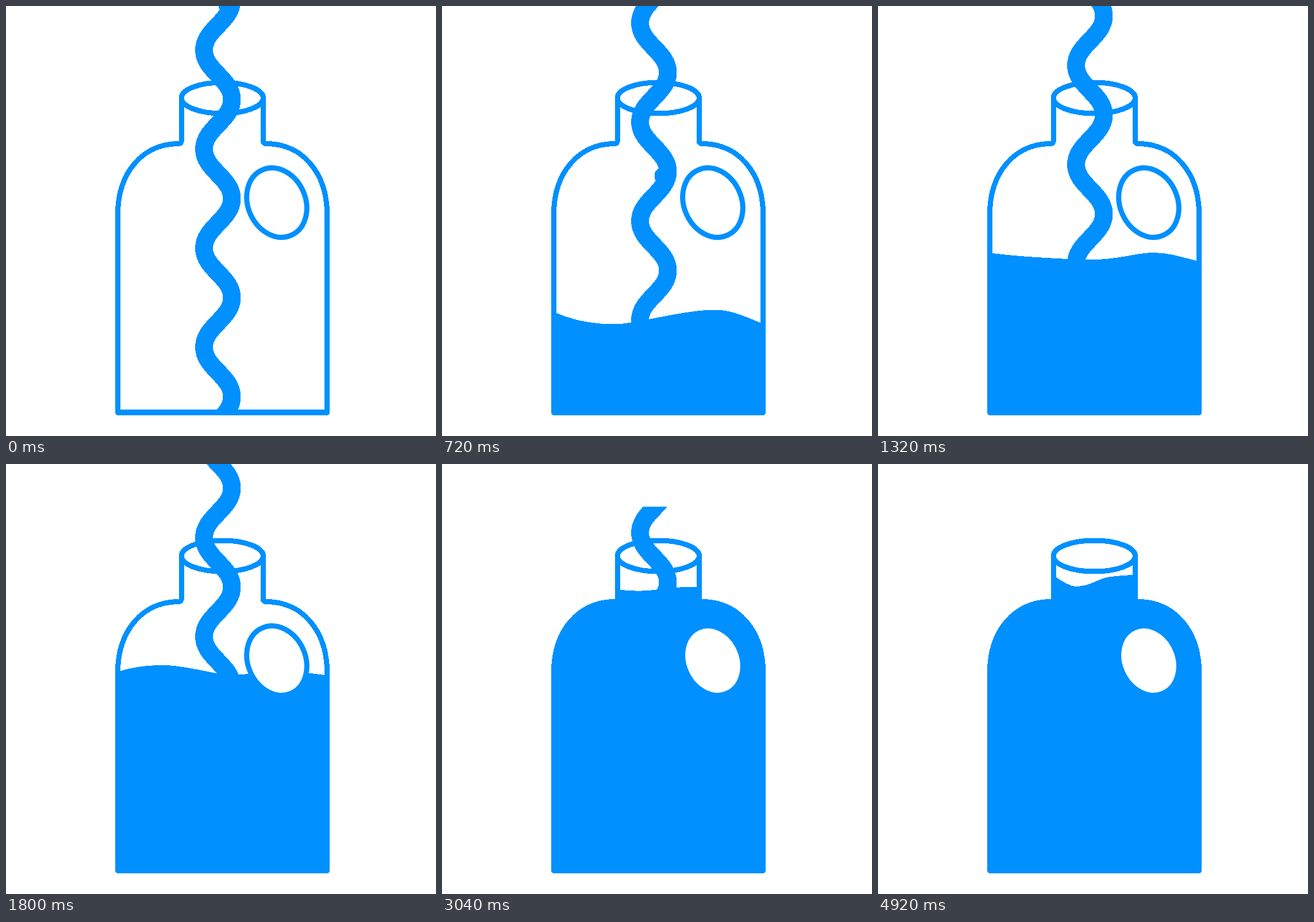
Recreate the animation shown at these times as an HTML page without scripts. Size 748 by 748 pixels, loop 5000 ms.

```html
<!DOCTYPE html>
<html lang="en">
<head>
<meta charset="utf-8">
<title>Filling bottle</title>
<style>
  html, body { margin: 0; width: 100%; height: 100%; overflow: hidden; background: #fff; }
  svg { display: block; width: 100vw; height: 100vh; shape-rendering: crispEdges; }
  .line { fill: none; stroke: #0090ff; stroke-width: 9; stroke-linejoin: round; }
  .stream { stroke-width: 31; }
  .hole { fill: #fff; }
  .soft { shape-rendering: auto; }
  .fill { fill: #0090ff; }

  /* The small lead keeps each step clear of its boundary. */
  .pour, .water { animation: pour 5s -4ms infinite; }
  .water { animation-name: rise; }

  @keyframes pour {
    0% { transform: translateY(0); animation-timing-function: steps(18); }
    14.4% { transform: translateY(297.5px); animation-timing-function: steps(67); }
    68%, 100% { transform: translateY(1397px); }
  }

  @keyframes rise {
    0% {
      d: path("M199 702C232 702 265 702 300 702S420 702 475 702C500 702 520 702 554 702V720H199Z");
      animation-timing-function: steps(18);
    }
    14.4% {
      d: path("M199 534C232 548 265 553.5 300 553.5S420 528.5 475 528.5C500 528.5 520 537 554 551V720H199Z");
      animation-timing-function: steps(15);
    }
    26.4% {
      d: path("M199 430C245 436 290 438 350 441S450 429 478 429C505 429 525 436 554 443V720H199Z");
      animation-timing-function: steps(12);
    }
    36% {
      d: path("M199 360C225 352 250 350 275 350S345 360 365 364C400 372 480 355 554 367V720H199Z");
      animation-timing-function: steps(11);
    }
    44.8% {
      d: path("M199 318C229 292 270 285 304 285S358 298 388 300C420 298 493 296 554 338V720H199Z");
      animation-timing-function: steps(6);
    }
    49.6% {
      d: path("M199 296C232 272 280 255 320 254S365 270 400 270C430 262 500 272 554 331V720H199Z");
      animation-timing-function: steps(8);
    }
    56% {
      d: path("M199 240C232 238 280 238 320 239S365 234 400 232C420 230 500 232 554 236V720H199Z");
      animation-timing-function: steps(14);
    }
    67.2% {
      d: path("M199 165C265 172 305 192 335 195S380 196 405 193C420 191 430 190 554 186V720H199Z");
      animation-timing-function: steps(14);
    }
    78.4% {
      d: path("M199 150C260 160 315 207 340 207S380 184 405 184C418 184 420 196 554 196V720H199Z");
      animation-timing-function: steps(25);
    }
    98.4%, 100% {
      d: path("M199 140C262 150 318 213 344 213S384 198 405 196C425 194 430 193 554 188V720H199Z");
    }
  }
</style>
</head>
<body>
<svg viewBox="0 0 748 748">
  <defs>
    <path id="bottle" d="M305.2 160V235Q305.2 239.5 300 239.5C236 239.5 194.5 292 194.5 362V707.5H558.5V362C558.5 292 517 239.5 453 239.5Q447.3 239.5 447.3 235V160"/>
    <clipPath id="inside"><use href="#bottle"/></clipPath>
    <clipPath id="aboveBase"><rect width="748" height="706"/></clipPath>
    <clipPath id="streamEnd"><rect y="-1175" width="748" height="2000"/></clipPath>

    <!-- One wave of the stream, then doubled twice -->
    <path id="wave" class="line stream" d="M344.5 593.4c0 36 48.5 50.2 48.5 86.2s-48.5 50.2-48.5 86.2v1"/>
    <g id="pair"><use href="#wave"/><use href="#wave" y="-172.3"/></g>
    <g id="four"><use href="#pair"/><use href="#pair" y="-344.6"/></g>
  </defs>

  <path class="fill water" clip-path="url(#inside)" d="M199 702C232 702 265 702 300 702S420 702 475 702C500 702 520 702 554 702V720H199Z"/>
  <use href="#bottle" class="line"/>
  <ellipse class="line hole" style="fill:#fff" cx="376.3" cy="160" rx="71.2" ry="27"/>
  <ellipse class="line hole soft" style="fill:#fff" cx="471" cy="342" rx="50" ry="62.2" transform="rotate(-24.4 471 342)"/>

  <g clip-path="url(#aboveBase)">
    <g class="pour">
      <g clip-path="url(#streamEnd)">
        <use href="#four"/>
        <use href="#four" y="-689.2"/>
        <use href="#four" y="-1378.4"/>
        <circle class="fill" cx="385" cy="-2" r="15.5"/>
      </g>
    </g>
  </g>
</svg>
</body>
</html>
```
